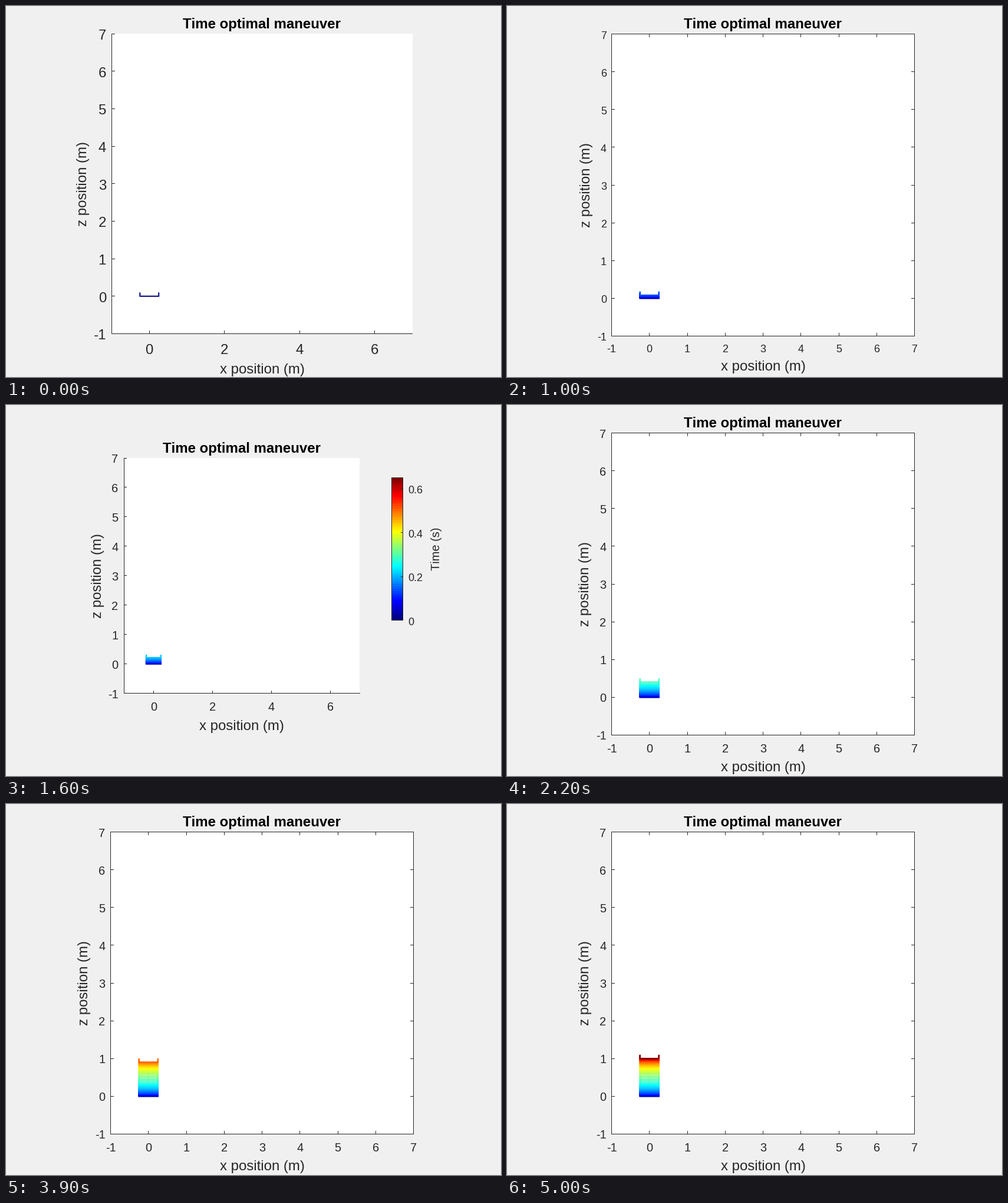
A matplotlib script that plays this animation: 840x630 px, repeating every 5.1 s.

```python
import numpy as np
import matplotlib.pyplot as plt
from matplotlib.animation import FuncAnimation
from matplotlib.collections import LineCollection
from matplotlib.patches import Rectangle

W, H, DPI = 840, 630, 100
FRAMES, INTERVAL = 51, 100
PT = 72 / DPI  # points per pixel
INK = "#262626"
SWITCH = 0.477  # share of the climb spent accelerating

plt.rcParams["font.family"] = "Liberation Sans"
plt.rcParams["text.kerning_factor"] = 6

# Plot styles in pixels: box = left, top, right, bottom; text places are
# baselines, dy is the drop of a y tick label below its tick.
OPEN = dict(box=(179.5, 47, 689.5, 556.5), framed=False, step=2, tick=5,
            size=24, title=(434.5, 38), xlabel=(435, 624), ylabel=(137, 302),
            xtick=591, ytick=170, dy=10, bar=False)
SMALL = dict(box=(177.5, 47.5, 691.5, 560.5), framed=True, step=1, tick=5,
             size=18, title=(434.5, 38), xlabel=(435, 619), ylabel=(141, 304),
             xtick=588, ytick=169, dy=8, bar=False)
BARRED = dict(box=(200.5, 90, 600, 489.5), framed=False, step=2, tick=4,
              size=20, title=(400, 81), xlabel=(400, 552), ylabel=(162, 290),
              xtick=519, ytick=190.5, dy=8, bar=True)
FRAMED = dict(SMALL, size=20, xlabel=(435, 622), ylabel=(139, 304),
              xtick=590, ytick=168.5)


def style_at(i):
    if i < 8:
        return OPEN
    if i < 12:
        return SMALL
    return BARRED if i < 17 else FRAMED


def jet(v):
    v = np.asarray(v, float)[..., None]
    return np.clip(1.5 - np.abs(4 * v - np.array([3, 2, 1])), 0, 1)


def height(i):
    """Bang-bang climb from 0 to 1: constant push, then constant braking."""
    s = i / (FRAMES - 1)
    if s < SWITCH:
        return s * s / SWITCH
    return 1 - (1 - s) ** 2 / (1 - SWITCH)


def line(xs, ys, color=INK, z=3):
    """One-pixel line through pixel centres."""
    ax.plot(np.floor(xs) + 0.5, np.floor(ys) + 0.5, color=color, lw=PT,
            zorder=z, snap=False, solid_capstyle="projecting",
            solid_joinstyle="miter")


def text(x, y, s, size, **kw):
    style = dict(color=INK, ha="center", va="baseline") | kw
    ax.text(x, y, s, fontsize=size * PT, **style)


def side_text(x, y, s, size):
    text(x, y, s, size, rotation=90, rotation_mode="anchor")


def draw_axes(st):
    left, top, right, bottom = st["box"]
    ax.add_patch(Rectangle((left, top), right - left, bottom - top,
                           fc="white", ec="none", zorder=0))
    if st["framed"]:
        line([left, right, right, left, left],
             [top, top, bottom, bottom, top])
    else:
        line([left, left, right], [top, bottom, bottom])

    n = st["tick"]
    for k in range(-1, 8):
        x = left + (k + 1) * (right - left) / 8
        y = bottom - (k + 1) * (bottom - top) / 8
        text(st["ytick"], y + st["dy"], str(k), st["size"], ha="right")
        line([left, left + n], [y, y])
        if st["framed"]:
            line([right - n, right], [y, y])
            line([x, x], [top, top + n])
        if k % st["step"] == 0:
            line([x, x], [bottom - n, bottom])
            text(x, st["xtick"], str(k), st["size"])

    text(*st["title"], "Time optimal maneuver", 24, weight="bold",
         color="black")
    text(*st["xlabel"], "x position (m)", 24)
    side_text(*st["ylabel"], "z position (m)", 24)


def draw_colorbar():
    left, right, top, bottom = 654.5, 673.5, 123.5, 365.5
    ax.imshow(jet(np.linspace(1, 0, 64))[:, None], aspect="auto",
              extent=(left, right, bottom, top), interpolation="nearest")
    line([left, right, right, left, left], [top, top, bottom, bottom, top])
    for label in ("0", "0.2", "0.4", "0.6"):
        y = bottom - float(label) / 0.65 * (bottom - top)
        line([right - 3, right], [y, y])
        text(682, y + 8, label, 18, ha="left")
    side_text(736, 244, "Time (s)", 20)


def draw_vehicle(i, st):
    left, top, right, bottom = st["box"]
    sx, sy = (right - left) / 8, (bottom - top) / 8
    cx, half, leg = left + sx, 0.25 * sx, 0.1 * sy
    levels = [bottom - sy * (1 + height(k)) for k in range(i + 1)]
    if i:
        line([cx, cx], [levels[0], levels[-1]], color="#b0b0b0", z=1)
    cups = [[(cx - half, y - leg), (cx - half, y),
             (cx + half, y), (cx + half, y - leg)] for y in levels]
    trail = LineCollection(cups, colors=jet(np.arange(i + 1) / (FRAMES - 1)),
                           linewidths=2 * PT, capstyle="butt",
                           joinstyle="miter", zorder=2)
    trail.set_snap(False)
    ax.add_collection(trail, autolim=False)


def draw(i):
    ax.clear()
    ax.axis("off")
    st = style_at(i)
    draw_axes(st)
    if st["bar"]:
        draw_colorbar()
    draw_vehicle(i, st)
    ax.set_xlim(0, W)
    ax.set_ylim(H, 0)


fig = plt.figure(figsize=(W / DPI, H / DPI), dpi=DPI, facecolor="#f0f0f0")
ax = fig.add_axes([0, 0, 1, 1])
anim = FuncAnimation(fig, draw, frames=FRAMES, init_func=lambda: None,
                     interval=INTERVAL, repeat=True, repeat_delay=0)
plt.show()
```
